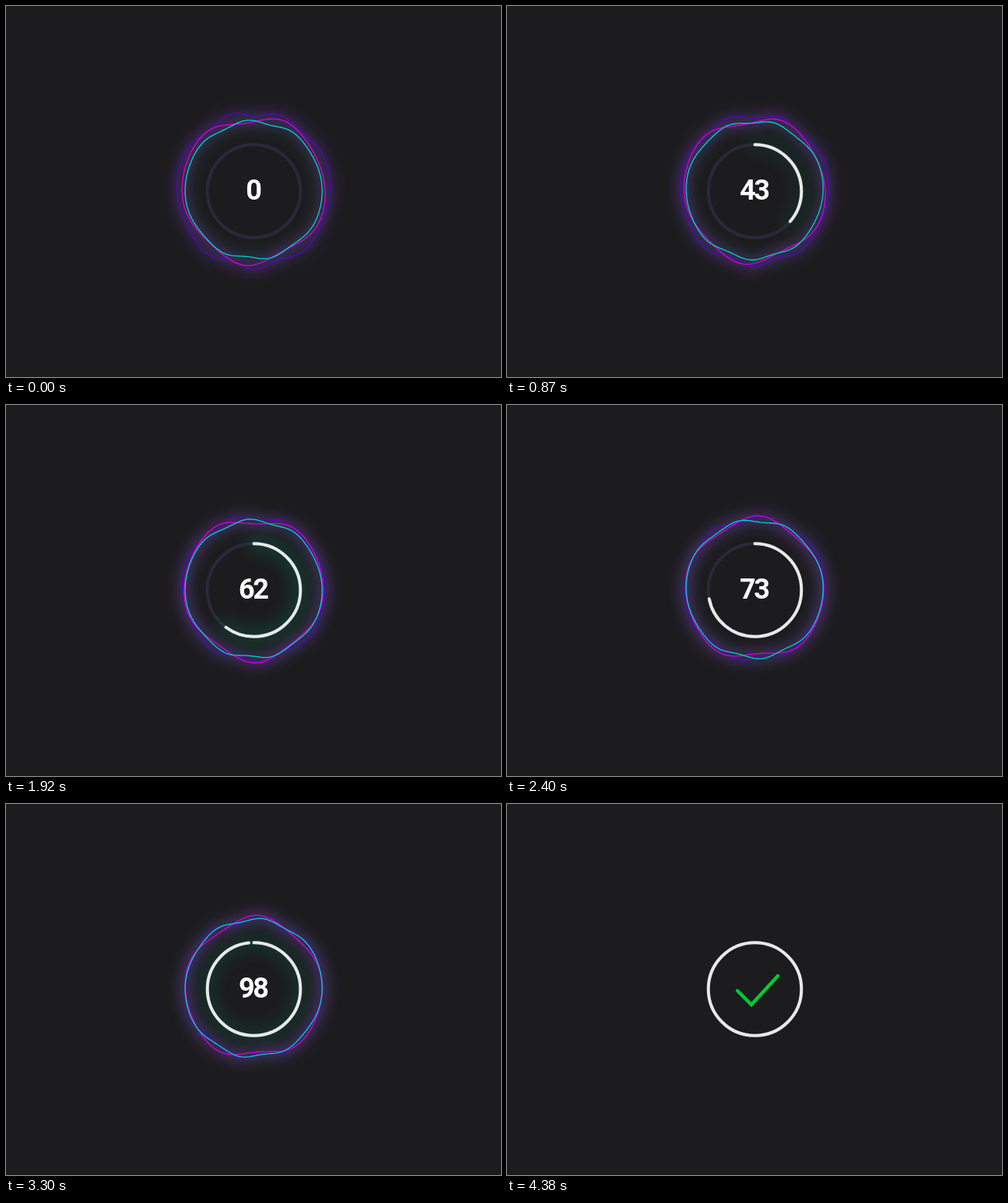
Recreate the animation shown at these times as an HTML page with a canvas. Size 636 px wide and 477 px high, loop 5100 ms.

```html
<!DOCTYPE html>
<html lang="en">
<head>
<meta charset="utf-8">
<title>Loader</title>
<style>
  html, body { margin: 0; width: 100%; height: 100%; overflow: hidden; background: #1c1c1e; }
  canvas { display: block; position: absolute; left: 0; top: 0; }
  #count {
    position: absolute; left: 218.5px; top: 217px; width: 200px;
    font: 700 36px/40px Roboto, "Open Sans", sans-serif;
    font-stretch: 75%; letter-spacing: -2.5px; text-indent: -2.5px;
    text-align: center; color: #fff;
  }
</style>
</head>
<body>
<canvas id="stage" width="636" height="477"></canvas>
<div id="count">0</div>
<script>
const ctx = document.getElementById('stage').getContext('2d');
const count = document.getElementById('count');
const LOOP = 5100, STEP = 30, TAU = Math.PI * 2;
const CX = 318.5, CY = 238, RING = 59.8;

// Circles warped by a vertical sine wave; hz is the wave's travel, drift the shrink per second.
const WAVES = [
  { rgb: '80,6,200', glow: '100,20,220', a: 0.18, r: 98.6, drift: 3.65, amp: 3.5, len: 63, at: 2, hz: 1.1 },
  { rgb: '212,0,216', glow: '200,0,220', a: 0.18, r: 92, drift: 1.38, amp: 5.6, len: 110, at: -12, hz: 1.11 },
  { rgb: '0,208,212', glow: '0,175,160', a: 0.14, r: 88, drift: 0, amp: 2, len: 60, at: 21, hz: -0.5 }
];

// [start, end, from, to]
const ARC = [[270, 990, 0, 37], [1515, 2235, 37, 72], [2940, 3420, 72, 100]];
const NUM = [[390, 1050, 0, 47], [1540, 2260, 47, 73], [2950, 3420, 73, 100]];

const span = (t, a, b) => Math.min(1, Math.max(0, (t - a) / (b - a)));
const inOut = s => s < 0.5 ? 4 * s ** 3 : 1 - 4 * (1 - s) ** 3;
const track = (keys, t) =>
  keys.reduce((v, [a, b, from, to]) => t >= a ? from + (to - from) * inOut(span(t, a, b)) : v, 0);

function wavePath(w, t, close) {
  const base = w.r - w.drift * Math.min(t, 2.9);
  const r = base + (RING - base) * close * close;
  const path = new Path2D();
  for (let i = 0; i < 240; i++) {
    const a = i / 240 * TAU, x = r * Math.cos(a);
    const lift = w.amp * Math.cos(TAU * ((x - w.at) / w.len - w.hz * t));
    path.lineTo(318.2 + x, 236.6 + r * Math.sin(a) + lift);
  }
  path.closePath();
  return path;
}

function stroke(path, color, width, blur = 0) {
  ctx.filter = blur ? `blur(${blur}px)` : 'none';
  ctx.strokeStyle = color;
  ctx.lineWidth = width;
  ctx.stroke(path);
  ctx.filter = 'none';
}

function ringPath(part) {
  const path = new Path2D();
  path.arc(CX, CY, RING, -TAU / 4, -TAU / 4 + TAU * part);
  return path;
}

function drawWaves(t) {
  const close = span(t, 3360, 4000);
  if (close === 1) return;
  const paths = WAVES.map(w => wavePath(w, t / 1000, close));
  ctx.save();
  ctx.globalAlpha = 1 - close;
  ctx.globalCompositeOperation = 'screen';
  WAVES.forEach((w, i) => stroke(paths[i], `rgba(${w.glow},${w.a})`, 12, 8));
  ctx.globalCompositeOperation = 'source-over';
  WAVES.forEach((w, i) => stroke(paths[i], `rgb(${w.rgb})`, 1.3));
  ctx.restore();
}

function drawRing(t) {
  const part = track(ARC, t) / 100;
  stroke(ringPath(1), '#2b283a', 4);
  if (part <= 0) return;
  const arc = ringPath(part);
  const glow = Math.max(...ARC.map(([a, b]) => Math.sin(Math.PI * span(t, a, b))));
  if (glow > 0.01) stroke(arc, `rgba(0,140,90,${0.27 * glow})`, 20, 9);
  stroke(arc, '#e8e8ea', 4);
}

function drawCheck(t) {
  const s = span(t, 3930, 4380);
  if (s === 0) return;
  const a = Math.hypot(18, 18), b = Math.hypot(34, 37);
  const d = (a + b) * (1 - (1 - s) ** 3);
  const p = Math.min(1, d / a), q = Math.max(0, (d - a) / b);
  const path = new Path2D();
  path.moveTo(296, 240);
  path.lineTo(296 + 18 * p, 240 + 18 * p);
  if (q > 0) path.lineTo(314 + 34 * q, 258 - 37 * q);
  stroke(path, '#00cb36', 4.4);
}

function drawCount(t) {
  const out = span(t, 3420, 3900);
  count.textContent = Math.floor(track(NUM, t) + 0.01);
  count.style.opacity = 1 - out;
  count.style.transform = `scale(${1 - 0.8 * out})`;
}

function draw(t) {
  ctx.fillStyle = '#1c1c1e';
  ctx.fillRect(0, 0, 636, 477);
  ctx.lineCap = 'round';
  ctx.lineJoin = 'miter';
  drawWaves(t);
  drawRing(t);
  drawCheck(t);
  drawCount(t);
}

const start = performance.now();
function tick() {
  const t = (performance.now() - start) % LOOP;
  draw(Math.floor(t / STEP) * STEP);
  requestAnimationFrame(tick);
}
tick();
</script>
</body>
</html>
```
